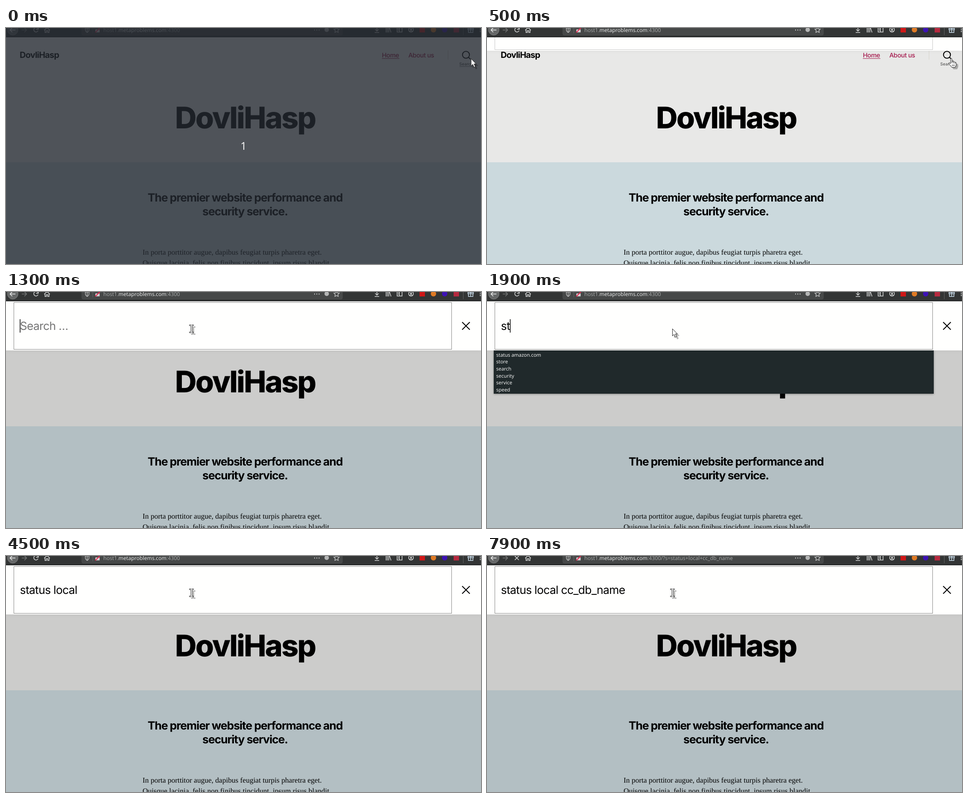
Write an HTML page that moves like this. It is 1059x529 px and loops after 8 s.

```html
<!DOCTYPE html>
<html lang="en">
<head>
<meta charset="utf-8">
<title>Site search</title>
<style>
html, body { margin: 0; width: 100%; height: 100%; overflow: hidden; background: #fffffe; }
svg { display: block; width: 1059px; height: 529px; font-family: Inter, sans-serif; }
text { white-space: pre; text-rendering: geometricPrecision; }
.bold { font-weight: 700; letter-spacing: -.0415625em; }
.nav { font-size: 14.1px; font-weight: 500; letter-spacing: -.0277em; fill: #a5184c; }
.serif { font: 16.55px "Liberation Serif", serif; }
.field { font-size: 25.3px; letter-spacing: -.0277em; }
.ui { font-family: "Open Sans", sans-serif; }
.line { fill: none; stroke: #d4d5d5; stroke-width: 1.5; }
.cursor { fill: #fff; stroke: #222; filter: drop-shadow(4px 4px .7px rgba(0, 0, 0, .28)); }
</style>
</head>
<body>
<svg viewBox="0 0 1059 529">
  <!-- page -->
  <rect width="1059" height="529" fill="#fffffe"/>
  <rect y="301" width="1059" height="228" fill="#dfeef3"/>
  <rect id="shade" y="20" width="1059" height="509" opacity="0"/>
  <text class="bold" x="30.6" y="67" font-size="19">DovliHasp</text>
  <text class="nav" x="838" y="65.7">Home</text>
  <path d="M838 68.5h39" stroke="#a5184c"/>
  <text class="nav" x="897" y="65.7">About us</text>
  <path d="M985.5 50v21" stroke="#d6d4cd"/>
  <g fill="none" stroke="#000" stroke-width="2">
    <circle cx="1025.5" cy="60" r="7.8"/><path d="M1031 65.500l4.500 4.500"/>
  </g>
  <text x="1026" y="84" font-size="9.2" font-weight="500" fill="#5a5a5a" text-anchor="middle">Search</text>
  <path id="underline" d="M1011 86.5h31" stroke="#777"/>
  <text class="bold" x="533" y="224.5" font-size="66.8" text-anchor="middle" style="font-weight:800">DovliHasp</text>
  <g class="bold" font-size="25.25" text-anchor="middle">
    <text x="533" y="388.7">The premier website performance and</text>
    <text x="533" y="420.2">security service.</text>
  </g>
  <text class="serif" x="304.5" y="508">In porta porttitor augue, dapibus feugiat turpis pharetra eget.</text>
  <text class="serif" x="304.5" y="532">Quisque lacinia, felis non finibus tincidunt, ipsum risus blandit</text>

  <!-- search panel -->
  <g id="panel">
    <rect y="20" width="1059" height="111" fill="#fffffe" style="filter:drop-shadow(0 0 4px rgba(0,0,0,.06))"/>
    <rect id="box" x="17.5" y="23.5" width="976" height="105" fill="none"/>
    <text id="field" class="field" x="31" y="85"></text>
    <rect id="caret" y="61" width="1.5" height="30"/>
    <path d="M1017 67.500l17 17m0-17l-17 17" stroke="#000" stroke-width="2"/>
  </g>
  <g id="popup" class="ui" font-size="11" fill="#fff" style="filter:drop-shadow(0 1px 2px rgba(0,0,0,.35))">
    <rect id="list" x="15" y="131" width="981" fill="#20292b"/>
  </g>

  <!-- browser bar -->
  <rect width="1059" height="20" fill="#333535"/>
  <path d="M0 20h1059" stroke="#151717" stroke-width="1.5"/>
  <path d="M169 0h581v13q0 3-3 3H172q-3 0-3-3z" fill="#464848" stroke="#4c4e4e"/>
  <circle cx="15" cy="4" r="12" fill="#666868" stroke="#7d7f7f"/>
  <g class="line">
    <path d="M21 4.500H9m5-5l-5 5 5 5" stroke="#eee"/>
    <path d="M35 4.500h11m-5-5l5 5-5 5" stroke="#747676"/>
    <path id="reload" d="M71 1a5 5 0 1 0 .5 5M72-2v5h-5"/>
    <path id="stop" d="M62 0l9 9m0-9l-9 9"/>
    <path d="M85 5l6.500-6 6.500 6M87 4v6h3V6h3v4h3V4"/>
    <path d="M177 0h8v4q0 4-4 6-4-2-4-6zm4 0v10" stroke-width="1.200"/>
    <path d="M193.500 0v12" stroke="#626464" stroke-width="1"/>
    <path d="M200 4h8v5h-8z" fill="#d4d5d5"/>
    <path d="M199 10l11-11" stroke="#e6224c" stroke-width="2"/>
    <path d="M687 4.500h2m3 0h2m3 0h2" stroke-width="2"/>
    <path d="M737-2l1.800 4 4.200.5-3 3 .8 4.500-3.800-2-3.800 2 .8-4.500-3-3 4.200-.5z" stroke-width="1.200"/>
    <path d="M827-1v8m-4-4l4 4 4-4m-9 7h10"/>
    <path d="M847.500 0v10m3-10v10m3-10v10m1.500-10l3.500 10"/>
    <path d="M872-1h11v10h-11zm5 0v10m-3-7h2m-2 3h2"/>
    <circle cx="903" cy="4" r="5.300"/>
    <path d="M900 8q3-4 6 0"/>
    <path d="M1019.500 0v16" stroke="#626464" stroke-width="1"/>
    <path d="M1031 4h10v6h-10zm-1-3h12v3h-12zm6-2v11" stroke="#c9dcea"/>
    <path d="M1056 0h5m-5 4h5m-5 4h5"/>
  </g>
  <circle cx="903" cy="3" r="2" fill="#d4d5d5"/>
  <circle cx="715" cy="4" r="5" fill="#b4b5b5"/>
  <rect x="922" y="-2" width="12" height="12" fill="#cf1717"/>
  <circle cx="953" cy="4" r="6" fill="#df7a25"/>
  <circle cx="978" cy="4" r="6" fill="#3d12b5"/>
  <rect x="998" y="0" width="12" height="10" fill="#b52a3f"/>
  <text class="ui" x="217" y="9" font-size="11.73" fill="#aaacac">host1.<tspan fill="#f2f3f3">metaproblems.com</tspan>:4300<tspan id="query"></tspan></text>

  <g id="countdown">
    <rect width="1059" height="529" fill="#242930" opacity=".8"/>
    <text class="ui" x="529.500" y="272.500" font-size="24" fill="#fff" text-anchor="middle">1</text>
  </g>

  <!-- pointer shapes, hot spot at 0,0 -->
  <path id="arrow" class="cursor" d="M0 0v16l3.700-3.500 2.800 6.500 2.800-1.200-2.800-6.300H11z"/>
  <path id="hand" class="cursor" d="M-1.500 1q0-2 1.500-2t1.500 2v5q3-1 3.500.800 3-.8 3.300 1 3-.6 2.700 2.200v4l-2 5h-8l-6-8q-1-2.500 1.200-2.300l2.300 2.300zM1.500 6v4M5 7v3.500M8.300 8v3M2 13v3m2.500-3v3m2.500-3v3"/>
  <path id="beam" class="cursor" d="M-4.500-9h3.500l1 1 1-1h3.500v2H1.500V7h3v2H1l-1-1-1 1h-3.500V7h3V-7h-3z" stroke-width=".9"/>
</svg>
<script>
const LOOP = 8000, STEP = 100;
const TEXT = 'status local cc_db_name';
// [time, number of characters typed]
const KEYS = [[1500, 1], [1800, 2], [2200, 3], [2300, 4], [2500, 5], [2700, 6], [2800, 7],
  [2900, 8], [3000, 9], [3100, 10], [3200, 12], [3300, 13], [4700, 14], [4800, 15],
  [5100, 16], [5600, 17], [5800, 18], [6100, 19], [6200, 20], [6300, 21], [6400, 22], [6500, 23]];
// [time, rows in the suggestion list]
const LISTS = [[1600, 6], [2000, 2], [2300, 1], [2900, 0]];
const ROWS = ['status amazon.com', 'store', 'search', 'security', 'service', 'speed'];

const el = id => document.getElementById(id);
const set = (id, attrs) => { for (const k in attrs) el(id).setAttribute(k, attrs[k]); };
const show = (id, on) => { el(id).style.display = on ? '' : 'none'; };
const ramp = (t, from, to) => Math.min(1, Math.max(0, (t - from) / (to - from)));
const latest = (list, t) => list.filter(e => e[0] <= t).pop() || [0, 0];
const bezier = (a, b, c, p) => (1 - p) ** 2 * a + 2 * p * (1 - p) * b + p * p * c;

const rows = ROWS.map((label, i) => {
  const row = document.createElementNS('http://www.w3.org/2000/svg', 'text');
  row.textContent = label;
  row.setAttribute('x', 20.5);
  row.setAttribute('y', 144.7 + i * 15.6);
  return el('popup').appendChild(row);
});

function drawPanel(t) {
  const open = ramp(t, 458, 608), focused = t >= 700;
  show('panel', open > 0);
  set('panel', { transform: `translate(0 ${Math.round(-111 * (1 - open))})` });
  set('shade', { opacity: .2 * ramp(t, 410, 610) });
  set('box', { stroke: focused ? '#111' : '#c8c8c8', 'stroke-dasharray': focused ? '1 1' : 'none' });

  const [keyTime, typed] = latest(KEYS, t);
  const field = el('field');
  field.textContent = typed ? TEXT.slice(0, typed) : 'Search …';
  set('field', { fill: typed ? '#000' : '#757575' });
  set('caret', { x: 30.7 + (typed ? field.getComputedTextLength() : 0) });
  show('caret', focused && t - (keyTime || 700) < 1200);
}

function drawList(t) {
  const count = latest(LISTS, t)[1];
  show('popup', count);
  set('list', { height: 3.4 + 15.6 * count });
  rows.forEach((row, i) => { row.style.display = i < count ? '' : 'none'; });
  return count;
}

function drawPointer(t, listOpen) {
  const p = ramp(t, 800, 1300);
  const shape = t < 100 ? 'arrow' : p === 0 ? 'hand' : p < 1 || listOpen ? 'arrow' : 'beam';
  const x = t < 100 ? 1037 : bezier(1035, 720, 413.5, p);
  const y = bezier(69, 350, 82.5, p);
  for (const id of ['arrow', 'hand', 'beam']) show(id, id === shape);
  set(shape, { transform: `translate(${x} ${y})` });
}

function draw(now) {
  const t = Math.floor(now % LOOP / STEP) * STEP;
  show('countdown', t < 100);
  show('underline', t < 400);
  drawPanel(t);
  drawPointer(t, drawList(t));
  const load = ramp(t, 6800, 7200);
  set('reload', { opacity: 1 - ramp(load, 0, .6) });
  set('stop', { opacity: ramp(load, .4, 1) });
  el('query').textContent = t >= 7900 ? '/?s=' + TEXT.replace(/ /g, '+') : '';
}

function loop() {
  draw(performance.now());
  requestAnimationFrame(loop);
}
loop();
</script>
</body>
</html>
```
